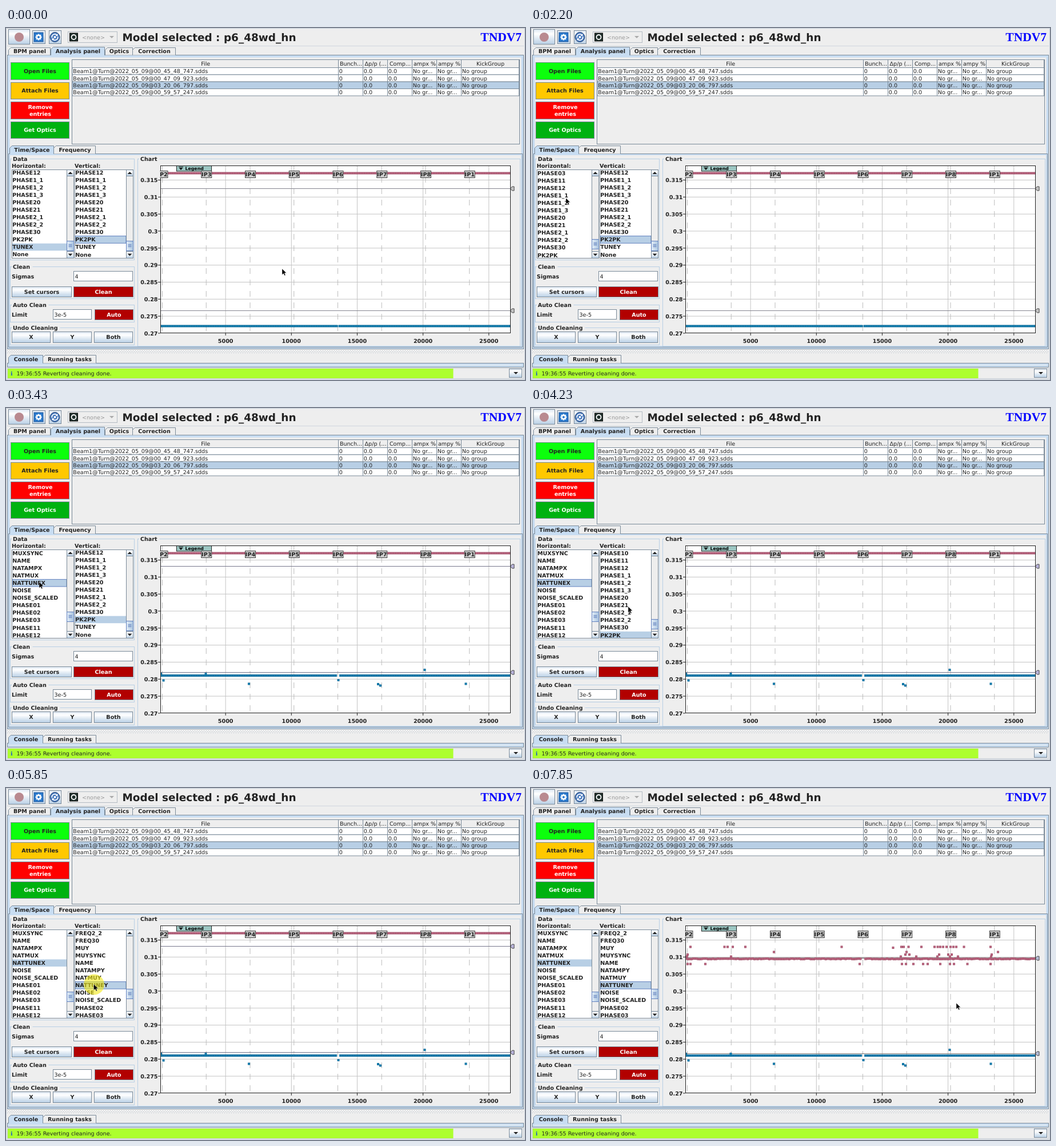
These frames come from a looping animation (908 by 617 pixels, 8000 ms). An HTML page:

```html
<!DOCTYPE html>
<html lang="en">
<head>
<meta charset="utf-8">
<title>Analysis panel</title>
<style>
html, body { margin: 0; width: 100%; height: 100%; overflow: hidden; background: #eee; }
svg { display: block; width: 908px; height: 617px; }
text { font: 9.6px "DejaVu Sans", sans-serif; fill: #222; text-rendering: geometricPrecision; white-space: pre; }
.b { font-weight: bold; }
</style>
</head>
<body>
<svg id="stage" viewBox="0 0 908 617" xmlns="http://www.w3.org/2000/svg"></svg>
<script>
const EDGE = '#7a8a99', PALE = '#b8cfe5', TAB = '#c8ddf2', BG = '#eeeeee';
const out = [];
const add = s => out.push(s);

const rect = (x, y, w, h, fill, stroke, extra = '') =>
  `<rect x="${x}" y="${y}" width="${w}" height="${h}" fill="${fill}" ${stroke ? `stroke="${stroke}"` : ''} ${extra}/>`;
const path = (d, fill, stroke = 'none', extra = '') => `<path d="${d}" fill="${fill}" stroke="${stroke}" ${extra}/>`;
const line = (x1, y1, x2, y2, color, extra = '') => path(`M${x1} ${y1}L${x2} ${y2}`, 'none', color, extra);
const text = (x, y, s, extra = '') =>
  `<text x="${x}" y="${y}" ${extra}>${s.replace(/</g, '&lt;')}</text>`;
const bold = (x, y, s, extra = '') => text(x, y, s, 'class="b" ' + extra);
const MID = 'text-anchor="middle"';
const down = (x, y, color = '#222') => path(`M${x - 4} ${y - 2}h8l-4 4z`, color);
const up = (x, y) => path(`M${x - 4} ${y + 2}h8l-4 -4z`, '#222');

function tab(x, y, w, h, label, on) {
  add(path(`M${x} ${y + h}V${y + 4}L${x + 4} ${y}H${x + w}V${y + h}`, on ? TAB : BG, EDGE));
  add(bold(x + w / 2 + .5, y + h - 3.2, label, MID));
}
function pane(x, y, w, h, rim) {
  add(rect(x, y, w, h, TAB, EDGE));
  add(rect(x + rim, y + rim, w - 2 * rim, h - 2 * rim, BG));
}
function group(x, y, w, h, label, width) {
  add(rect(x, y, w, h, 'none', PALE));
  add(rect(x + 3, y - 2, width, 4, BG));
  add(bold(x + 4.5, y + 3.2, label));
}
function button(x, y, w, h, label, fill = 'url(#metal)', color = '#222') {
  add(rect(x, y, w, h, fill, EDGE));
  if (label) add(bold(x + w / 2, y + h / 2 + 3.4, label, `${MID} style="fill:${color}"`));
}
function field(x, y, w, h, value) {
  add(rect(x, y, w, h, '#fff', EDGE));
  add(text(x + 2, y + h / 2 + 4, value));
}

add(`<defs>
<linearGradient id="metal" x2="0" y2="1"><stop stop-color="#dfe9f4"/><stop offset=".3" stop-color="#fff"/><stop offset="1" stop-color="#b8cfe5"/></linearGradient>
<linearGradient id="thumb"><stop stop-color="#e4eef8"/><stop offset="1" stop-color="#a9c4df"/></linearGradient>
<clipPath id="plot"><rect x="270" y="241" width="613" height="294"/></clipPath>
<clipPath id="listL"><rect x="11" y="249" width="96" height="154"/></clipPath>
<clipPath id="listR"><rect x="121" y="249" width="90" height="154"/></clipPath>
</defs>`);
add(rect(0, 0, 908, 617, BG));
add(rect(.5, .5, 907, 616, 'none', '#c3ccd6'));

function toolbar() {
  add(line(2, 31.5, 906, 31.5, '#cfd6de'));
  button(4.5, 2.5, 37, 26);
  add('<circle cx="23" cy="16" r="8" fill="#b98a90"/>');
  button(46.5, 4.5, 22, 23);
  add(rect(49, 8, 16, 16, '#2878cc', '#1a559b'));
  for (let a = 0; a < 180; a += 45)
    add(rect(51.5, 14.7, 11, 2.6, '#fff', '', `transform="rotate(${a} 57 16)"`));
  add('<circle cx="57" cy="16" r="3" fill="#2878cc" stroke="#fff" stroke-width="2"/>');
  button(75.5, 4.5, 21, 23);
  add('<circle cx="85.5" cy="16" r="8.5" fill="#4477bd" stroke="#28446f"/>');
  add(path('M80.5 17a5 5 0 0 1 9 -4M90.500 15a5 5 0 0 1 -9 4', 'none', '#fff', 'stroke-width="1.8"'));
  add(path('M90.500 10v4h-4zM80.500 22v-4h4z', '#fff'));
  add('<circle cx="85.500" cy="16" r="2" fill="#fff"/>');
  add(rect(108.5, 6.5, 86, 19, BG, '#b4bcc4'));
  add(rect(111.5, 9, 14, 14, '#20302c', '#111'));
  add('<circle cx="118.5" cy="16" r="4" fill="#20302c" stroke="#fff" stroke-width="1.8"/>');
  add(text(133, 19.5, '<none>', 'style="fill:#999"'));
  add(down(185, 16, '#aaa'));
  add(bold(203.5, 23, 'Model selected : p6_48wd_hn', 'style="font-size:18.45px"'));
  add(bold(902, 23, 'TNDV7', 'text-anchor="end" style="font-family:\'Liberation Serif\',serif;font-size:21.5px;fill:#00f"'));
}

function table() {
  const cols = [116, 581.5, 624.5, 667.5, 710.5, 753.5, 796.5, 897.5];
  const heads = ['File', 'Bunch...', 'Δp/p (...', 'Comp...', 'ampx %', 'ampy %', 'KickGroup'];
  const files = ['00_45_48_747', '00_47_09_923', '03_20_06_797', '00_59_57_247'];
  const rowY = i => 69.5 + i * 12.35;
  add(rect(115.5, 55.5, 783, 148, BG, EDGE));
  heads.forEach((h, i) => add(text((cols[i] + cols[i + 1]) / 2 + .5, 66, h, MID)));
  files.forEach((f, i) => {
    const y = rowY(i), base = y + 9.9;
    add(rect(116, y, 781.5, 12.35, i === 2 ? PALE : '#fff', EDGE));
    ['Beam1@Turn@2022_05_09@' + f + '.sdds', '0', '0.0', '0.0', 'No gr...', 'No gr...', 'No group']
      .forEach((s, c) => add(text(cols[c] + 1.3, base, s)));
  });
  cols.slice(1).forEach(x => add(line(x, 56, x, rowY(4), EDGE)));
}

function controls() {
  group(7.5, 229.5, 217, 177, 'Data', 31);
  add(bold(10, 245, 'Horizontal:'));
  add(bold(120, 245, 'Vertical:'));
  group(7.5, 418.5, 217, 56, 'Clean', 36);
  add(bold(10, 438.5, 'Sigmas'));
  field(118.5, 426.5, 103, 17, '4');
  button(10.5, 453.5, 104, 18, 'Set cursors');
  button(118.5, 453.5, 104, 18, 'Clean', '#b20000', '#fff');
  group(7.5, 485.5, 217, 30, 'Auto Clean', 64);
  add(bold(10, 505.5, 'Limit'));
  field(82.5, 493.5, 67, 17, '3e-5');
  button(155.5, 493.5, 67, 18, 'Auto', '#b20000', '#fff');
  group(7.5, 525.5, 217, 30, 'Undo Cleaning', 84);
  ['X', 'Y', 'Both'].forEach((s, i) => button(10.5 + 72 * i, 532.5, 67, 19, s));
}

const ROW = 13.05;
const TAIL = 'PHASE12 PHASE1_1 PHASE1_2 PHASE1_3 PHASE20 PHASE21 PHASE2_1 PHASE2_2 PHASE30 PK2PK';
const LISTS = {
  L: { x: 10.5, w: 96, thumb: 1.44, top: 357,
    items: `MUXSYNC NAME NATAMPX NATMUX NATTUNEX NOISE NOISE_SCALED PHASE01 PHASE02 PHASE03 PHASE11 ${TAIL} TUNEX None` },
  R: { x: 120.5, w: 90, thumb: 1.5, top: 352,
    items: `FREQ2_2 FREQ30 MUY MUYSYNC NAME NATAMPY NATMUY NATTUNEY NOISE NOISE_SCALED PHASE02 PHASE03 PHASE10 PHASE11 ${TAIL} TUNEY None` }
};
function list(id) {
  const { x, w, items } = LISTS[id], bar = x + w;
  add(rect(x, 248.5, w + 12, 155, '#fff', EDGE));
  add(`<g clip-path="url(#list${id})"><g id="rows${id}">`);
  add(rect(x + .5, 0, w - 1, 12.6, PALE, '', `id="sel${id}"`));
  items.split(' ').forEach((s, i) => add(bold(x + .7, 258 + i * ROW, s)));
  add('</g></g>');
  add(rect(bar, 248.5, 12, 155, BG, EDGE));
  button(bar, 248.5, 12, 11);
  button(bar, 391.5, 12, 12);
  add(up(bar + 6, 254));
  add(down(bar + 6, 397.5));
  add(`<g id="thumb${id}">${rect(bar, .5, 12, 17, 'url(#thumb)', '#6382bf')}`);
  [6.5, 8.5, 10.5].forEach(y => add(line(bar + 3, y, bar + 9, y, '#6382bf')));
  add('</g>');
}

const RED = ['#a3506a', '#c4708a'], BLUE = ['#0a6a98', '#1c8dc0'];
const dot = (x, y, [dark, light]) => rect(x - 1.5, y - 1.5, 3, 3, light, dark);
function band(y, colors, gap) {
  const seg = (a, b) =>
    line(a, y, b, y, colors[0], 'stroke-width="4"') +
    line(a, y, b, y, colors[1], 'stroke-width="1.8" stroke-dasharray="1.6 1.4"');
  return gap ? seg(271, 581 - gap) + seg(581 + gap, 883) : seg(271, 883);
}
function scatter() {
  const rows = {
    278.5: [279, 338.5, 344, 353, 375, 543.5, 648, 652, 660.5, 683, 706, 711.5, 716, 721, 727, 734, 739, 744, 757.5, 804],
    308.5: [274, 279, 305, 575, 649, 656, 669, 686, 694, 716, 733, 740, 763.5, 804],
    287.5: [425, 657, 817],
    292: [274, 655, 662, 714, 730, 736, 806],
    295.5: [273, 350, 647, 674, 711, 733, 747, 805]
  };
  let s = dot(633.5, 280, RED);
  for (const y in rows) rows[y].forEach(x => s += dot(x, +y, RED));
  s += line(271, 297.5, 883, 297.5, '#777', 'stroke-opacity=".7"');
  for (let x = 272; x < 883; x += 2.9)
    if (Math.abs(x - 581) > 2) s += dot(x, 299.5 + .5 * Math.sin(x * x), RED);
  return s;
}
function strays() {
  return [[271, 466], [275.5, 477.5], [349.5, 466], [425, 483.5], [581.5, 477], [651, 484], [655, 486.5], [732.5, 459], [804.5, 483.5]]
    .map(([x, y]) => dot(x, y, BLUE)).join('');
}

function chart() {
  group(230.5, 229.5, 669, 329, 'Chart', 35);
  add(rect(270, 241, 613, 294, '#fff'));
  for (let i = 0; i < 10; i++) {
    const y = 266.5 + i * 29.83;
    add(bold(265.5, y + 3.8, String(+(0.315 - i * .005).toFixed(3)), 'text-anchor="end"'));
    add(line(266, y, 270, y, '#222'));
    if (i < 9) add(line(270, y, 883, y, '#c4c4c4'));
  }
  for (let i = 1; i < 6; i++) {
    const x = 269 + i * 115.15;
    add(line(x, 241, x, 535, '#c4c4c4'));
    add(line(x, 535, x, 539, '#222'));
    add(bold(x, 551.5, String(i * 5000), MID));
  }
  const ips = [2, 3, 4, 5, 6, 7, 8, 1].map((n, i) => [n, 273.5 + i * 76.75]);
  add('<g clip-path="url(#plot)">');
  ips.forEach(([, x]) => add(line(x, 241, x, 535, '#bcbcbc', 'stroke-dasharray="10 10"')));
  add('<g id="rule0"></g><g id="rule1"></g>');
  add(`<g id="redLine">${band(254.5, RED)}</g><g id="redDots">${scatter()}</g>`);
  add(`<g id="blueLow">${band(522.5, BLUE, .6)}</g><g id="blueMid">${band(469, BLUE, 2)}${strays()}</g>`);
  add('</g>');
  add(rect(298.5, 241.5, 61, 9.500, '#9cc6c2', '#222'));
  add(line(302, 243.5, 310, 243.5, '#111') + path('M302.500 245h7l-3.500 4z', '#111'));
  add(bold(313.5, 249, 'Legend', 'style="font-size:7.8px;fill:#000"'));
  add(rect(270.5, 241.5, 612, 293, 'none', '#222'));
  add('<g clip-path="url(#ips)"><clipPath id="ips"><rect x="269.500" y="245" width="613" height="20"/></clipPath>');
  ips.forEach(([n, x]) => {
    add(rect(x - 8.5, 250.5, 18, 12, '#cccccc', '#444'));
    add(bold(x + .5, 260.3, 'IP' + n, MID));
  });
  add('</g><g id="tag0"></g><g id="tag1"></g>');
}

function footer() {
  for (let x = 2; x < 906; x += 4)
    add(rect(x, 565, 1, 1, '#b4bec8') + rect(x + 2, 567, 1, 1, '#b4bec8') + rect(x, 569, 1, 1, '#b4bec8'));
  pane(2.5, 587.5, 903, 7, 3);
  tab(4.5, 573.5, 60, 14, 'Console', true);
  tab(64.5, 573.5, 93, 14, 'Running tasks');
  add(line(5, 587.5, 64, 587.5, TAB));
  add(rect(2.5, 596.5, 903, 18, BG, '#c3ccd6'));
  add(rect(3, 597, 779.5, 17, '#adff2f'));
  add(bold(8, 609, 'i', 'style="fill:#2060c0;font-family:\'DejaVu Serif\',serif"'));
  add(text(18.5, 609, '19:36:55 Reverting cleaning done.'));
  button(880.5, 597.5, 22, 15);
  add(down(892, 605));
}

toolbar();
pane(2.5, 47.5, 903, 515, 4);
tab(4.5, 34.5, 73, 13, 'BPM panel');
tab(78.5, 33.5, 94, 14, 'Analysis panel', true);
tab(173.5, 34.5, 48, 13, 'Optics');
tab(221.5, 34.5, 75, 13, 'Correction');
add(line(79, 47.5, 172, 47.5, TAB));
button(8.5, 60.5, 102, 30, 'Open Files', '#0cff0c');
button(8.5, 95.5, 102, 29, 'Attach Files', '#ffc800');
button(8.5, 129.5, 102, 30, '', '#ff0000');
add(bold(60, 142.3, 'Remove', `${MID} style="fill:#fff"`) + bold(60, 154, 'entries', `${MID} style="fill:#fff"`));
button(8.5, 164.5, 102, 29, 'Get Optics', '#00b210', '#fff');
table();
pane(4.5, 220.5, 899, 339, 2.5);
tab(6.5, 206.5, 77, 14, 'Time/Space', true);
tab(83.5, 206.5, 73, 14, 'Frequency');
add(line(7, 220.5, 83, 220.5, TAB));
controls();
list('L');
list('R');
chart();
footer();
add('<circle id="halo" r="18" fill="#f2ea18" fill-opacity=".6"/>');
add(path('M0 0V10.600L2.500 8.300L4.300 12L6 11.200L4.300 7.600H7.600Z', '#000', '#fff', 'id="cursor" stroke-width=".4"'));
document.getElementById('stage').innerHTML = out.join('');

// Each step lists only what changes at that moment.
const steps = [
  [0, { at: [483, 422], L: 11.08, R: 14.08, selL: 21, selR: 23, focus: 'R', view: 0, halo: false }],
  [1200, { at: [351, 375] }],
  [1400, { at: [195, 328] }],
  [1600, { at: [91, 303] }],
  [1800, { at: [61, 298] }],
  [2200, { L: 9 }],
  [2400, { L: 6 }],
  [2600, { L: 3 }],
  [2800, { L: 0 }],
  [3030, { at: [58, 305] }],
  [3230, { selL: 4, focus: 'L', halo: true }],
  [3430, { view: 1, halo: false }],
  [3630, { at: [82, 314] }],
  [3830, { at: [140, 338] }],
  [4030, { at: [170, 348] }],
  [4230, { R: 12 }],
  [4430, { R: 9 }],
  [4630, { R: 6 }],
  [5030, { R: 3 }],
  [5230, { R: 0 }],
  [5430, { at: [160, 347] }],
  [5650, { at: [153.5, 344] }],
  [5850, { selR: 7, focus: 'R', halo: true }],
  [6050, { view: 2, halo: false }],
  [6450, { at: [240, 383] }],
  [6650, { at: [430, 318] }],
  [6850, { at: [640, 257] }],
  [7050, { at: [707, 326] }],
  [7250, { at: [692, 332] }],
  [7460, { at: [676, 329] }],
  [7650, { at: [751, 357] }],
  [7850, { at: [744, 377] }]
];
const views = [
  { rules: [281.5, 495.5], color: '#85858f', tag: '#c4c4c4' },
  { rules: [277.5, 463.5], color: '#77778c', tag: '#b9b4dc' },
  { rules: [298.5, 465.5], color: '#777777', tag: '#b4bcd8' }
];

const $ = id => document.getElementById(id);
const show = (id, on) => $(id).setAttribute('visibility', on ? 'visible' : 'hidden');
const move = (id, x, y) => $(id).setAttribute('transform', `translate(${x} ${y})`);

function render(s) {
  for (const id of ['L', 'R']) {
    const { thumb, top } = LISTS[id];
    move('rows' + id, 0, -s[id] * ROW);
    move('thumb' + id, 0, Math.round(top + s[id] * thumb));
    const sel = $('sel' + id);
    sel.setAttribute('y', 248.2 + s['sel' + id] * ROW);
    sel.setAttribute('stroke', s.focus === id ? '#6382bf' : 'none');
  }
  const { rules, color, tag } = views[s.view];
  rules.forEach((y, i) => {
    $('rule' + i).innerHTML = line(270, y, 883, y, color);
    $('tag' + i).innerHTML = path(`M882.500 ${y}l3 -3.500h3.500v7h-3.500z`, tag, '#444');
  });
  show('redLine', s.view < 2);
  show('redDots', s.view === 2);
  show('blueLow', s.view === 0);
  show('blueMid', s.view > 0);
  show('halo', s.halo);
  move('halo', s.at[0] + .5, s.at[1] + .5);
  move('cursor', ...s.at);
}

const start = performance.now();
let last = -1;
function tick() {
  const t = (performance.now() - start) % 8000;
  const n = steps.filter(([at]) => at <= t).length;
  if (n !== last) {
    last = n;
    render(Object.assign({}, ...steps.slice(0, n).map(([, change]) => change)));
  }
  requestAnimationFrame(tick);
}
tick();
</script>
</body>
</html>
```
